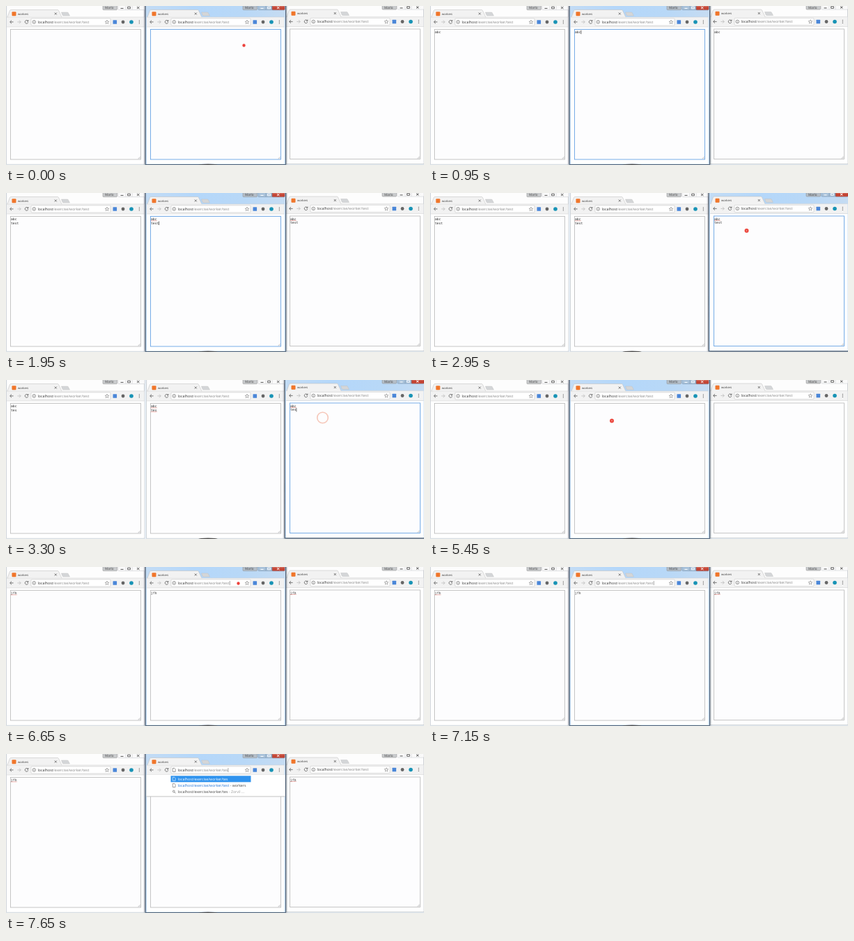
Write an HTML page that moves like this. It is 600 px wide and 228 px high and loops after 8000 ms.

```html
<!DOCTYPE html>
<html lang="en">
<head>
<meta charset="utf-8">
<title>Synced text areas</title>
<style>
html, body { margin: 0; width: 600px; height: 228px; overflow: hidden; background: #fff; }
svg { display: block; }
text { font-family: "Open Sans", "Noto Sans", sans-serif; text-rendering: geometricPrecision; white-space: pre; }
.mono { font: 4.6px "DejaVu Sans Mono", monospace; fill: #222; }
.url { font-size: 5.25px; }
</style>
</head>
<body>
<svg width="600" height="228" viewBox="0 0 600 228">
  <defs>
    <linearGradient id="glass">
      <stop offset="0" stop-color="#c3dcf5"/>
      <stop offset=".35" stop-color="#b4d7fa"/>
      <stop offset=".7" stop-color="#b8d8f7"/>
      <stop offset="1" stop-color="#c6dcf2"/>
    </linearGradient>
    <linearGradient id="close" x2="0" y2="1">
      <stop offset="0" stop-color="#dc8675"/>
      <stop offset=".6" stop-color="#c03a2a"/>
      <stop offset="1" stop-color="#cf5a46"/>
    </linearGradient>
    <filter id="shade" x="-5%" y="-5%" width="110%" height="110%">
      <feDropShadow dx="0" dy="0" stdDeviation="1.5" flood-color="#1d2c3e" flood-opacity=".95"/>
    </filter>
  </defs>
  <g id="stage"></g>
</svg>
<script>
const LOOP = 8000, STEP = 50, BLINK = 500;
const ORIGINS = [[0, 0], [201, 0], [401, -.5]];
const CHAR = 2.77, LINE = 5.8;

// [time, shared text]
const TEXTS = [[-500, ''], [400, 'a'], [650, 'ab'], [950, 'abc'], [1250, 'abc\n'], [1450, 'abc\nt'],
  [1650, 'abc\nte'], [1750, 'abc\ntes'], [1900, 'abc\ntest'], [3200, 'abc\ntes'], [3900, 'abc\nte'],
  [4750, ''], [5700, 'j'], [5800, 'jf'], [5900, 'jfh']];
// [time, window, x, y]
const CLICKS = [[0, 1, 341.5, 56.5], [2900, 2, 454.5, 54], [4100, 0, 98, 57.5], [5400, 1, 261, 58.5], [6650, 1, 333.5, 23.5]];
const URL_CLICK = 6650, URL_EDIT = 7200;

const last = (list, t) => list.filter(e => e[0] <= t).pop();
const rect = (x, y, w, h, fill, more = '') => `<rect x="${x}" y="${y}" width="${w}" height="${h}" fill="${fill}" ${more}/>`;
const path = (d, stroke, width = .7, more = 'fill="none"') => `<path d="${d}" stroke="${stroke}" stroke-width="${width}" ${more}/>`;
const dot = (x, y, r, fill, more = '') => `<circle cx="${x}" cy="${y}" r="${r}" fill="${fill}" ${more}/>`;
const text = (x, y, s, fill, cls = 'url', more = '') => `<text x="${x}" y="${y}" fill="${fill}" class="${cls}" ${more}>${s}</text>`;
const span = (s, fill) => `<tspan fill="${fill}">${s}</tspan>`;
const page = (y, color) => path(`M38.3 ${y - 2.5}h2.6l1.2 1.2v3.8h-3.8z`, color, .6);

function buttons(active) {
  const edge = active ? '#6f88a3' : '#c4c7ca', ink = active ? '#fff' : '#555';
  return rect(139, -1, 20.5, 6.6, active ? '#b4bec8' : '#c9cbcd', 'rx="1" stroke="#888" stroke-width=".5"')
    + text(142, 4.3, 'Marlo', '#444', '', 'font-size="4.6"')
    + rect(161, -1, 38, 6.6, active ? '#a9c2da' : '#fafafa', `rx="1" stroke="${edge}" stroke-width=".5"`)
    + (active ? rect(181, -1, 18, 6.6, 'url(#close)', 'rx="1" stroke="#833" stroke-width=".4"') : '')
    + path('M172 0v5.4M181 0v5.4', edge, .5)
    + path('M164.5 3.4h4', ink, 1) + path('M174.6 1.2h3.8v2.6h-3.8z', ink, .9)
    + path('M188 1l3.4 3M191.4 1l-3.4 3', ink, 1);
}

function toolbar(editing) {
  const ink = '#555';
  return rect(1, 16, 197.5, 14, '#f2f2f2')
    + path('M1 15.9H198.5M1 30H198.5', '#cfcfcf', .5)
    + path('M2 16L5.5 6.5Q6 5.5 7 5.5H74q1 0 1.5 1L80 16z', '#bbb', .5, 'fill="#f2f2f2"')
    + rect(2.6, 15.4, 77, 1.2, '#f2f2f2')
    + path('M79.5 9h8.5q1 0 1.3.7l2.2 4.3h-9q-1 0-1.4-.8z', '#bbb', .4, 'fill="#d4d6d8"')
    + rect(8.5, 8.3, 6, 6, '#f0762b', 'rx="1"')
    + text(17, 12.8, 'workers', '#333', '', 'font-size="4.1"')
    + path('M69.8 9.5l3 3M72.8 9.5l-3 3', '#444', .7)
    + path('M10.6 22.9H5.8M8 20.6l-2.3 2.3 2.3 2.3', ink, .8)
    + path('M16.4 22.9h4.8M19 20.6l2.3 2.3-2.3 2.3', '#bbb', .8)
    + path('M31.4 21.4a2.3 2.3 0 1 0 .4 2M31.9 20v1.9h-1.9', ink, .8)
    + rect(36, 17.8, 114, 10.2, '#fff', 'rx="1" stroke="#bdbdbd" stroke-width=".5"')
    + (editing ? page(22.9, ink)
      : dot(40.3, 22.9, 2.3, 'none', `stroke="${ink}" stroke-width=".6"`) + path('M40.3 22.5v1.7M40.3 21.3v.6', ink, .6))
    + text(45.5, 24.7, span('localhost', '#333') + span('/exercise/worker/' + (editing ? 'tes' : 'test'), '#888'), '#333')
    + path('M145 20.2l.8 1.9 2 .1-1.6 1.3.6 2-1.8-1.1-1.8 1.1.6-2-1.6-1.3 2-.1z', '#666', .5)
    + rect(153.5, 20.2, 5.6, 5.6, '#4a86d8', 'rx=".6"')
    + dot(168, 23, 2.4, '#666') + dot(180, 23, 2.8, '#1793b5')
    + [20.9, 22.9, 24.9].map(y => dot(191.3, y, .55, ink)).join('');
}

function area(i, t, content, focused) {
  const lines = content.split('\n'), end = lines.length - 1;
  // Spell-check marks reach the windows at different times
  const marked = n => content === 'jfh' ? i !== 1
    : t >= 1250 && t < 5000 && (t >= 4100 && i === 0 || i === 1 && (n === 0 || t >= 3200) || i === 2 && n === 0);
  let out = rect(6.5, 33.5, 187, 186.5, '#fdfdfe', `stroke="${focused ? '#68a4e4' : '#bfbfbf'}" stroke-width=".9"`)
    + path('M189.6 219.2l3-3M191.3 219.2l1.4-1.4', '#888', .5);
  lines.forEach((s, n) => {
    const y = 39 + n * LINE;
    out += text(7.1, y, s, '#222', 'mono');
    if (s && marked(n)) out += path(`M7.2 ${y + .9}h${s.length * CHAR}`, '#e0483c', .6, 'stroke-dasharray="1 .5"');
  });
  const since = Math.max(last(TEXTS, t)[0], ...CLICKS.filter(c => c[0] && c[0] <= t).map(c => c[0] + 100));
  if (focused && Math.floor((t - since) / BLINK) % 2 === 0)
    out += rect(7.3 + lines[end].length * CHAR, 34.8 + end * LINE, .6, 5.4, '#111');
  return out;
}

function dropdown(t) {
  const k = Math.min(1, Math.max(0, (t - 7450) / 200));
  const h = 58 - 27.5 * (1 - (1 - k) ** 2), link = 'localhost/exercise/worker/tes';
  return rect(.5, 30, 199, h + .9, '#bbb') + rect(.5, 30, 199, h, '#fff')
    + rect(35.5, 31.3, 115, 9, '#2f93ee')
    + page(35.8, '#fff') + text(45.5, 37.6, link, '#fff')
    + page(45, '#666') + text(45.5, 46.9, span(link + 't', '#2374d6') + span(' - workers', '#444'), '#444')
    + dot(39.8, 53.6, 1.4, 'none', 'stroke="#666" stroke-width=".7"') + path('M40.8 54.7l1.6 1.6', '#666', .8)
    + text(45.5, 56.2, link + span(' - Zorvil ...', '#999'), '#444');
}

function browser(i, t, content, active) {
  const [x, y] = ORIGINS[i], inUrl = active && t >= URL_CLICK, editing = inUrl && t >= URL_EDIT;
  const focused = active && !inUrl && !(t >= 5400 && t < 5500);
  const frame = active
    ? rect(-.8, -6, 201.3, 233.3, 'url(#glass)', 'stroke="#3c4d60" stroke-width=".8" filter="url(#shade)"')
    : rect(.8, -6, 197.9, 233, '#fdfdfd', 'stroke="#b4b8bc" stroke-width=".6"');
  return `<g transform="translate(${x} ${y})">` + frame + rect(1, 30, 197.5, 196.5, '#fff')
    + buttons(active) + toolbar(editing) + area(i, t, content, focused)
    + (editing ? dropdown(t) : '')
    + (inUrl ? rect(editing ? 117.7 : 119.9, 20, .5, 6, '#555') : '') + '</g>';
}

function ring(t) {
  const [start, , x, y] = last(CLICKS, t), p = t - start;
  if (p >= 500) return '';
  const outer = 2.2 + .016 * p, hole = .011 * p + .000016 * p * p;
  return dot(x, y, (outer + hole) / 2, 'none',
    `stroke="rgb(236,${66 + p * .14},${60 + p * .07})" stroke-width="${outer - hole}" opacity="${1 - (p / 520) ** 2}"`);
}

const desktop = rect(0, 0, 600, 228, '#e6edf4') + rect(398, 40, 6, 14, '#b5cde2')
  + rect(398, 148, 6, 13, '#86a6c6') + rect(398, 171, 6, 7, '#9db5cc');
const blob = '<ellipse cx="290" cy="228.3" rx="14" ry="1.8" fill="#555"/>';

function draw(t) {
  const front = last(CLICKS, t)[1], content = last(TEXTS, t)[1];
  const order = [0, 1, 2].filter(i => i !== front).concat(front);
  return desktop + order.map(i => browser(i, t, content, i === front)).join('') + blob + ring(t);
}

const stage = document.getElementById('stage');
let shown = -1;
function tick() {
  const t = Math.floor(performance.now() % LOOP / STEP) * STEP;
  if (t !== shown) stage.innerHTML = draw(shown = t);
  requestAnimationFrame(tick);
}
tick();
</script>
</body>
</html>
```
